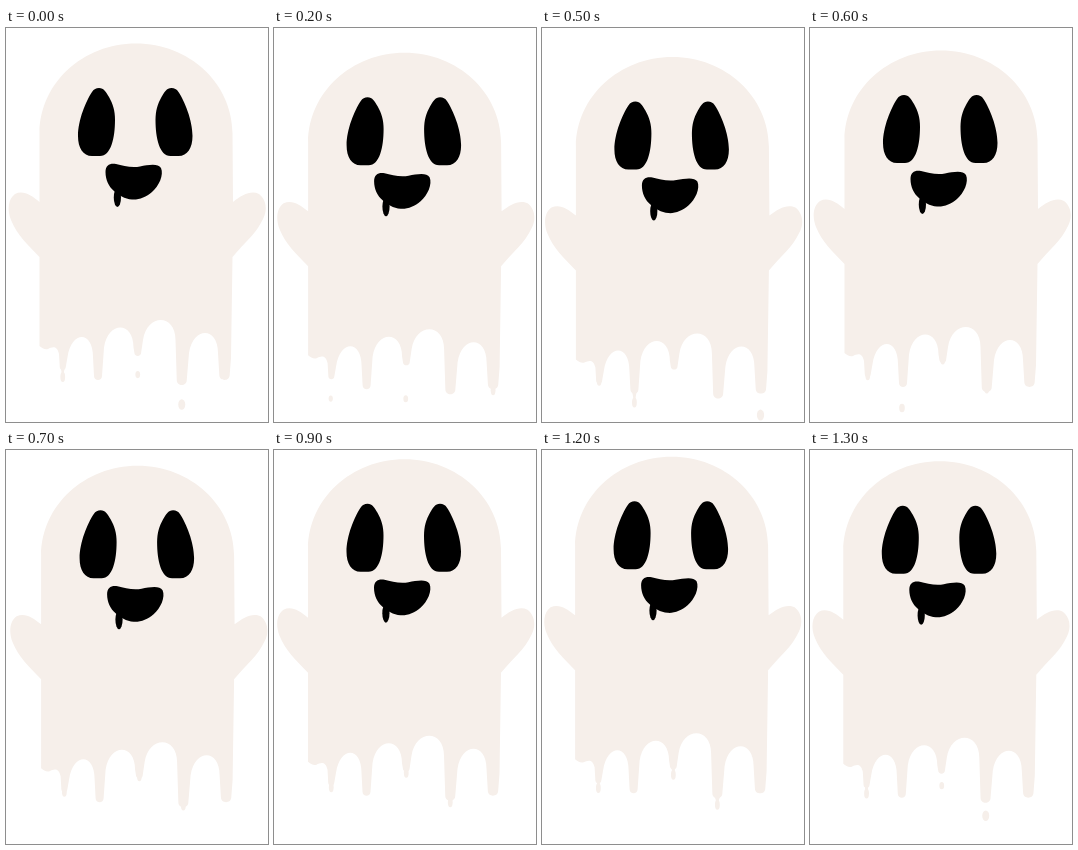
These frames come from a looping animation (262 by 394 pixels, 1400 ms). An HTML page with a canvas:

```html
<!DOCTYPE html>
<html>
<head>
<meta charset="utf-8">
<style>
html, body { margin: 0; width: 100%; height: 100%; overflow: hidden; background: #fff; }
canvas { display: block; }
</style>
</head>
<body>
<canvas id="stage" width="262" height="394"></canvas>
<script>
const ctx = document.getElementById('stage').getContext('2d');
const STEP = 100, STEPS = 14;
const wrap = s => (s + STEPS) % STEPS;

// Float path: key poses, linear in between
const poses = [
  { s: 0, x: 0, y: 0 },
  { s: 2, x: .6, y: 9.3 },
  { s: 5, x: .4, y: 13.6 },
  { s: 7, x: 1.6, y: .3 },
  { s: 11, x: -.6, y: -13 },
  { s: 14, x: 0, y: 0 }
];
function poseAt(s) {
  const i = poses.findLastIndex(p => p.s <= s);
  const a = poses[i], b = poses[i + 1], t = (s - a.s) / (b.s - a.s);
  return { x: a.x + (b.x - a.x) * t, y: a.y + (b.y - a.y) * t };
}

// top: arch to the right; the tip stretches for `grow` steps, then lets a drop go
const drips = [
  { l: 53, r: 60.5, tip: 342, top: 309, stretch: 13, grow: 12, release: 1 },
  { l: 87, r: 97, tip: 352, top: 299.5, stretch: 21, grow: 3, release: 6 },
  { l: 127.5, r: 136, tip: 328, top: 292, stretch: 12, grow: 8, release: 13 },
  { l: 169.5, r: 182, tip: 357, top: 305, stretch: 13, grow: 8, release: 13 },
  { l: 212, r: 225, tip: 352, stretch: 12, grow: 4, release: 4 }
];

const upper = 'M33.5 319L33.5 229C21 216 11 207 5 192C1 182 2 171 9 166C17 162 25 167 33.5 174' +
  'L33.5 105C34 55 77 15.5 130 15.5C183 15.5 226 55 226.5 105L227 174' +
  'C236 167 245 162 253 166C260 171 262 182 257 191C250 206 239 214 226.5 229L225 330';

function bodyPath() {
  let d = upper;
  for (let i = drips.length - 1; i >= 0; i--) {
    const { l, r, tip } = drips[i];
    const x = (l + r) / 2, w = (r - l) * .4, low = tip + w / 3;
    d += `L${x + w} ${tip - w}C${x + w} ${low} ${x - w} ${low} ${x - w} ${tip - w}`;
    if (i) {
      const { r: left, top } = drips[i - 1];
      const foot = top + 20, c = top - 6.7;
      d += `L${l} ${foot}C${l} ${c} ${left + 5} ${c} ${left + 1} ${foot}`;
    }
  }
  return new Path2D(d + 'L53 326C51 317 46 319 42 321C39 322 36 320 33.5 318Z');
}

const body = bodyPath();
const eye = new Path2D('M93 60C98 60 100 64 103 69C107 76 109 83 109 92C109 110 105 128 94 128L86 128C77 128 72 120 72 108C72 92 80 73 86 64C88 61 90 60 93 60Z');
const mouth = new Path2D('M99.5 144C99.5 137 104 135 110 136C117 138 126 140 134 138.5C142 137 152 135 155 140C158 147 153 158 146 164C140 169 133 172 126 171.5C119 171 112 167 108 163C103 159 99.5 152 99.5 144Z');

function ellipse(x, y, rx, ry) {
  ctx.beginPath();
  ctx.ellipse(x, y, rx, ry, 0, 0, 2 * Math.PI);
  ctx.fill();
}

function strand({ l, r, tip, stretch, grow, release }, s) {
  const left = wrap(release - s);
  if (left === 0 || left >= grow) return;
  const x = (l + r) / 2, w = (r - l) * .36;
  const end = tip + stretch * (1 - left / grow);
  ctx.beginPath();
  ctx.moveTo(x - w, tip - 4);
  ctx.quadraticCurveTo(x - 1, tip, x - .8, end - 4);
  ctx.lineTo(x + .8, end - 4);
  ctx.quadraticCurveTo(x + 1, tip, x + w, tip - 4);
  ctx.fill();
  ellipse(x, end - 5, 2.4, 5);
}

function drop({ l, r, tip, stretch, release }, s) {
  const age = wrap(s - release);
  const y = tip + stretch + poseAt(release).y + 10.5 * age + .4 * age * age;
  const size = (r - l) * .28;
  if (y < 390) ellipse((l + r) / 2, y, size, size * 1.5);
}

function draw(s) {
  const pose = poseAt(s);
  ctx.fillStyle = '#fff';
  ctx.fillRect(0, 0, 262, 394);
  ctx.fillStyle = '#f6efea';
  drips.forEach(d => drop(d, s));
  ctx.save();
  ctx.translate(pose.x, pose.y);
  ctx.fill(body);
  drips.forEach(d => strand(d, s));
  ctx.fillStyle = '#000';
  ctx.fill(mouth);
  ellipse(111.4, 169.5, 3.6, 9.5);
  ctx.fill(eye);
  ctx.translate(258.5, 0);
  ctx.scale(-1, 1);
  ctx.fill(eye);
  ctx.restore();
}

function frame() {
  draw(Math.floor(performance.now() / STEP) % STEPS);
  requestAnimationFrame(frame);
}
frame();
</script>
</body>
</html>
```
